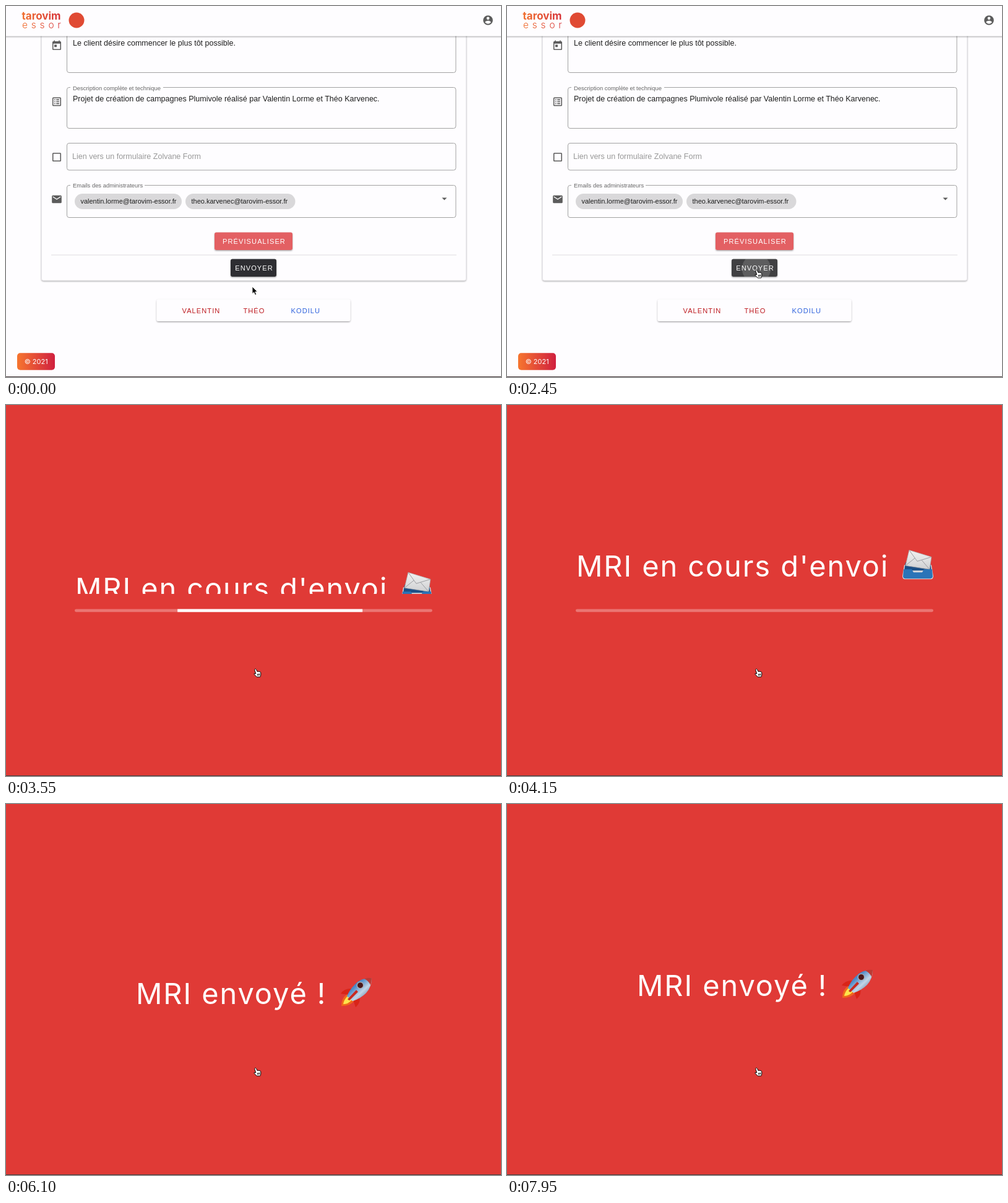
These frames come from a looping animation (800 px wide and 599 px high, 8 s). An HTML page:

```html
<!DOCTYPE html>
<html lang="fr">
<head>
<meta charset="utf-8">
<title>Envoi</title>
<style>
  html, body { margin: 0; width: 100%; height: 100%; overflow: hidden; background: #fefdff; }
  svg { display: block; width: 100vw; height: 100vh; }
  text { font-family: "Liberation Sans", Arial, sans-serif; font-size: 12.52px; fill: #1d1d1d; white-space: pre; }
  .label { font-size: 9.43px; fill: #666; }
  .hint { fill: #989898; }
  .chip { font-size: 10.97px; }
  .btn { font-size: 11.1px; letter-spacing: 1.05px; }
  .mid { text-anchor: middle; }
  .white { fill: #fff; }
  .red { fill: #bd1a20; }
  .blue { fill: #2f62dd; }
  .field { fill: none; stroke: #a2a2a2; }
  .icon { fill: #5c5c5c; fill-rule: evenodd; }
  .brand { font-family: Inter, sans-serif; fill: url(#warm); }
  .title { font-family: Inter, sans-serif; font-size: 47px; letter-spacing: 1.9px; fill: #fff; }
</style>
</head>
<body>
<svg viewBox="0 0 800 599" preserveAspectRatio="none" xmlns="http://www.w3.org/2000/svg">
  <defs>
    <linearGradient id="warm" gradientUnits="userSpaceOnUse" x1="26" y1="0" x2="93" y2="0">
      <stop offset="0" stop-color="#f1702f"/><stop offset="1" stop-color="#d5313c"/>
    </linearGradient>
    <linearGradient id="pill">
      <stop offset="0" stop-color="#f6752f"/><stop offset="1" stop-color="#d0203f"/>
    </linearGradient>
    <linearGradient id="hull" x1="0" y1="0" x2="1" y2="1">
      <stop offset="0" stop-color="#2d609e"/><stop offset=".35" stop-color="#4f8bc8"/>
      <stop offset=".6" stop-color="#c3d5e6"/><stop offset="1" stop-color="#26517f"/>
    </linearGradient>
    <linearGradient id="paper" x1="0" y1="0" x2="0" y2="1">
      <stop offset="0" stop-color="#f2f2f2"/><stop offset="1" stop-color="#cfd0d2"/>
    </linearGradient>
    <filter id="lift" x="-10%" y="-30%" width="120%" height="170%">
      <feDropShadow dx="0" dy="1.2" stdDeviation="1.1" flood-color="#000" flood-opacity=".38"/>
    </filter>
    <clipPath id="sendClip"><rect x="363" y="408.5" width="74" height="28.5" rx="3"/></clipPath>
    <clipPath id="trackClip"><rect x="111" y="329.4" width="578" height="4.8" rx="2.4"/></clipPath>
    <clipPath id="topClip"><rect x="100" y="227" width="600" height="78"/></clipPath>
    <clipPath id="doneClip"><rect x="200" y="260" width="400" height="78"/></clipPath>
  </defs>

  <rect width="800" height="599" fill="#fefdff"/>

  <g id="page">
    <rect x="57.5" y="20" width="686" height="423" rx="3" fill="#fefdff" stroke="#e6e4e8" stroke-width=".7" filter="url(#lift)"/>
    <rect class="field" x="98.5" y="20" width="628.5" height="87.5" rx="3.5"/>
    <text x="108" y="64">Le client désire commencer le plus tôt possible.</text>
    <rect class="field" x="98.5" y="131.5" width="628.5" height="66" rx="3.5"/>
    <rect x="104" y="129" width="150" height="5" fill="#fefdff"/>
    <text class="label" x="108" y="135.5">Description complète et technique</text>
    <text x="108" y="154">Projet de création de campagnes Plumivole réalisé par Valentin Lorme et Théo Karvenec.</text>
    <rect class="field" x="98.5" y="221.5" width="628.5" height="43.5" rx="3.5"/>
    <text class="hint" x="107" y="247.3">Lien vers un formulaire Zolvane Form</text>
    <rect class="field" x="98.5" y="289.5" width="628.5" height="52" rx="3.5"/>
    <rect x="104" y="287" width="120" height="5" fill="#fefdff"/>
    <text class="label" x="108" y="293">Emails des administrateurs</text>
    <rect x="111" y="303" width="173" height="25" rx="12.5" fill="#d9d8da"/>
    <text class="chip" x="120.5" y="319.4">valentin.lorme@tarovim-essor.fr</text>
    <rect x="290" y="303" width="177.5" height="25" rx="12.5" fill="#d9d8da"/>
    <text class="chip" x="299.5" y="319.4">theo.karvenec@tarovim-essor.fr</text>
    <path d="M704.5 309.5h8l-4 4z" fill="#5c5c5c"/>
    <g id="icons" class="icon"></g>

    <rect x="337" y="365.5" width="126" height="28.5" rx="3" fill="#e36064" filter="url(#lift)"/>
    <text class="btn white mid" x="401" y="383.6">PRÉVISUALISER</text>
    <path d="M73 402H728" stroke="#dedde0"/>
    <rect id="send" x="363" y="408.5" width="74" height="28.5" rx="3" fill="#2f2f31" filter="url(#lift)"/>
    <g clip-path="url(#sendClip)"><circle id="ripple" cx="403" cy="424" fill="#fff" opacity=".15"/></g>
    <text class="btn white mid" x="401" y="426.8">ENVOYER</text>

    <rect x="243.5" y="473.5" width="313" height="35.5" rx="3" fill="#fefdff" filter="url(#lift)"/>
    <text class="btn red" x="284.5" y="495.6">VALENTIN</text>
    <text class="btn red mid" x="401" y="495.6">THÉO</text>
    <text class="btn blue" x="460.5" y="495.6">KODILU</text>

    <rect x="18" y="560.3" width="61" height="27.5" rx="5" fill="url(#pill)"/>
    <text class="white mid" x="48.7" y="577.8" style="font-family:Inter,sans-serif;font-size:11px">© 2021</text>

    <rect x="-5" y="-5" width="810" height="53.5" fill="#fefdff" filter="url(#lift)"/>
    <text class="brand" x="25.5" y="22" style="font-size:17px;font-weight:700">tarovim</text>
    <text class="brand" x="26" y="36" style="font-size:15.5px;font-weight:300;letter-spacing:5.8px">essor</text>
    <circle cx="114" cy="23" r="12.5" fill="#e04a33"/>
    <g id="account" class="icon"></g>
  </g>

  <g id="panel">
    <rect y="-2" width="800" height="600" fill="#e03a36"/>
    <g clip-path="url(#topClip)"><g id="sending">
      <text class="title" x="112" y="277">MRI en cours d'envoi</text>
      <g transform="translate(639 234)">
        <path d="M3 24H47L50 42Q50 47 46 47H4Q0 47 0 42z" fill="#d5d8dc"/>
        <path d="M5 20H45L47 33H3z" fill="#1c4f86"/>
        <path d="M11 0L47 11L44 31L5 25z" fill="url(#paper)" stroke="#a9abae" stroke-width=".7"/>
        <path d="M11 0L24 18L47 11M5 25L20 13M44 31L31 16" fill="none" stroke="#9b9da1"/>
        <path d="M2 31H15L18 36H32L35 31H48L49 43Q48 46 45 46H5Q2 46 1 43z" fill="#2b74b8"/>
      </g>
    </g></g>
    <g id="loader">
      <rect x="111" y="329.4" width="578" height="4.8" rx="2.4" fill="#fff" opacity=".3"/>
      <g clip-path="url(#trackClip)" fill="#fff">
        <rect id="long" y="329" height="6"/><rect id="short" y="329" height="6"/>
      </g>
    </g>
    <g clip-path="url(#doneClip)"><g id="done">
      <text class="title" x="210" y="310">MRI envoyé !</text>
      <g transform="translate(541 267)">
        <path d="M19 18Q6 17 0 26L13 28zM30 31Q33 40 24 48L20 36z" fill="#d92418"/>
        <path d="M10 27Q1 33 1 46Q16 46 22 37z" fill="#f0671c"/>
        <path d="M11 30Q5 36 4 43Q12 43 18 36z" fill="#ffe44b"/>
        <path d="M50 1Q33 0 23 11Q14 20 10 30L19 38Q32 34 41 25Q50 15 50 1z" fill="url(#hull)"/>
        <path d="M50 1Q44 0 38 2Q45 5 48 12Q50 7 50 1z" fill="#bd3a33"/>
        <path d="M25 20L11 35L14 37L28 23z" fill="#c92a20"/>
        <circle cx="31.5" cy="12.5" r="5.8" fill="#a9adb5"/>
        <circle cx="31.5" cy="12.5" r="4.5" fill="#4a1719"/>
      </g>
    </g></g>
  </g>

  <rect y="598" width="800" height="1" fill="#4a3d3f"/>

  <g id="cursor" stroke-linejoin="round">
    <path id="arrow" d="M0 0V11.5L2.7 9.2L4.6 13.6L6.7 12.7L4.8 8.4H8.3z" fill="#000" stroke="#fff" stroke-width=".9"/>
    <path id="hand" d="M-.8 .6Q.6 -.6 1.5 1L3 4.5Q4 3.4 5 4.4Q6.2 3.7 6.9 4.8Q8.2 4.3 8.6 5.8L9 9.2L7.8 13H2.2L-1.6 9Q-2.6 7.4 -1 7.2L.8 8L-1 2.2Q-1.4 1.2 -.8 .6zM3.6 8V11M5.3 7.8V10.8M7 7.6V10.6" fill="#fff" stroke="#000" stroke-width=".95"/>
  </g>
</svg>

<script>
const LOOP = 8000;
const $ = id => document.getElementById(id);
const clamp = v => Math.min(1, Math.max(0, v));
const mix = (a, b, k) => a + (b - a) * k;

// CSS "ease": cubic-bezier(.25, .1, .25, 1), solved by bisection
function ease(x) {
  x = clamp(x);
  const curve = (a, b, s) => 3 * a * s * (1 - s) ** 2 + 3 * b * s * s * (1 - s) + s ** 3;
  let lo = 0, hi = 1;
  for (let i = 0; i < 24; i++) {
    const s = (lo + hi) / 2;
    if (curve(.25, .25, s) < x) lo = s; else hi = s;
  }
  return curve(.1, 1, lo);
}
const tween = (t, start, length) => ease((t - start) / length);
const show = (id, on) => $(id).setAttribute('visibility', on ? 'inherit' : 'hidden');
const move = (id, x, y) => $(id).setAttribute('transform', `translate(${x} ${y})`);

function icon(parent, cx, cy, d) {
  const p = document.createElementNS('http://www.w3.org/2000/svg', 'path');
  p.setAttribute('d', d);
  p.setAttribute('transform', `translate(${cx} ${cy}) scale(.782) translate(-12 -12)`);
  $(parent).append(p);
}
const box = 'M5 3H19A2 2 0 0 1 21 5V19A2 2 0 0 1 19 21H5A2 2 0 0 1 3 19V5A2 2 0 0 1 5 3zM5 5V19H19V5z';
icon('icons', 82, 64, 'M7 10H12V15H7zM19 19H5V8H19zM19 3H18V1H16V3H8V1H6V3H5A2 2 0 0 0 3 5V19A2 2 0 0 0 5 21H19A2 2 0 0 0 21 19V5A2 2 0 0 0 19 3z');
icon('icons', 82, 154.5, box + [7, 11, 15].map(y => `M7 ${y}h2v2h-2zM11 ${y}h6v2h-6z`).join(''));
icon('icons', 82, 244, box);
icon('icons', 82, 312, 'M20 8L12 13L4 8V6L12 11L20 6zM20 4H4A2 2 0 0 0 2 6V18A2 2 0 0 0 4 20H20A2 2 0 0 0 22 18V6A2 2 0 0 0 20 4z');
icon('account', 779, 23, 'M12 2A10 10 0 0 0 12 22A10 10 0 0 0 12 2zM12 5A3 3 0 0 1 12 11A3 3 0 0 1 12 5zM12 19.2C9.5 19.2 7.3 17.9 6 16C6 14 10 12.9 12 12.9C14 12.9 18 14 18 16C16.7 17.9 14.5 19.2 12 19.2z');

// Edges are fractions of the track
function segment(id, left, right) {
  $(id).setAttribute('x', 111 + 578 * left);
  $(id).setAttribute('width', Math.max(0, 578 * (right - left)));
}

function drawLoader(t) {
  const phase = ((t - 760) % 2200 + 2200) % 2200 / 2200;
  const s = ease(phase / .6), l = ease((phase - .6) / .4);
  segment('short', mix(-2, 1.07, s), mix(0, 1.08, s));
  segment('long', mix(-.9, 1, l), mix(0, 1.35, l));
}

function render(t) {
  const go = tween(t, 1850, 350);
  const y = mix(453, 426, go), over = y < 437;
  move('cursor', mix(398, 403, go), y);
  show('arrow', !over);
  show('hand', over);
  $('send').setAttribute('fill', over ? '#414143' : '#2f2f31');
  $('ripple').setAttribute('r', t < 2360 ? 0 : mix(10, 42, clamp((t - 2360) / 220)));

  show('panel', t >= 2505);
  move('panel', 0, -598 * (1 - tween(t, 2505, 800)));
  drawLoader(t);
  show('loader', t < 5350);
  move('sending', 0, 78 * (1 - tween(t, 3240, 1000) - tween(t, 4260, 460)));
  move('done', 0, 78 * (1 - tween(t, 5358, 1400)));
}

const begin = performance.now();
function tick() {
  render((performance.now() - begin) % LOOP);
  requestAnimationFrame(tick);
}
tick();
</script>
</body>
</html>
```
